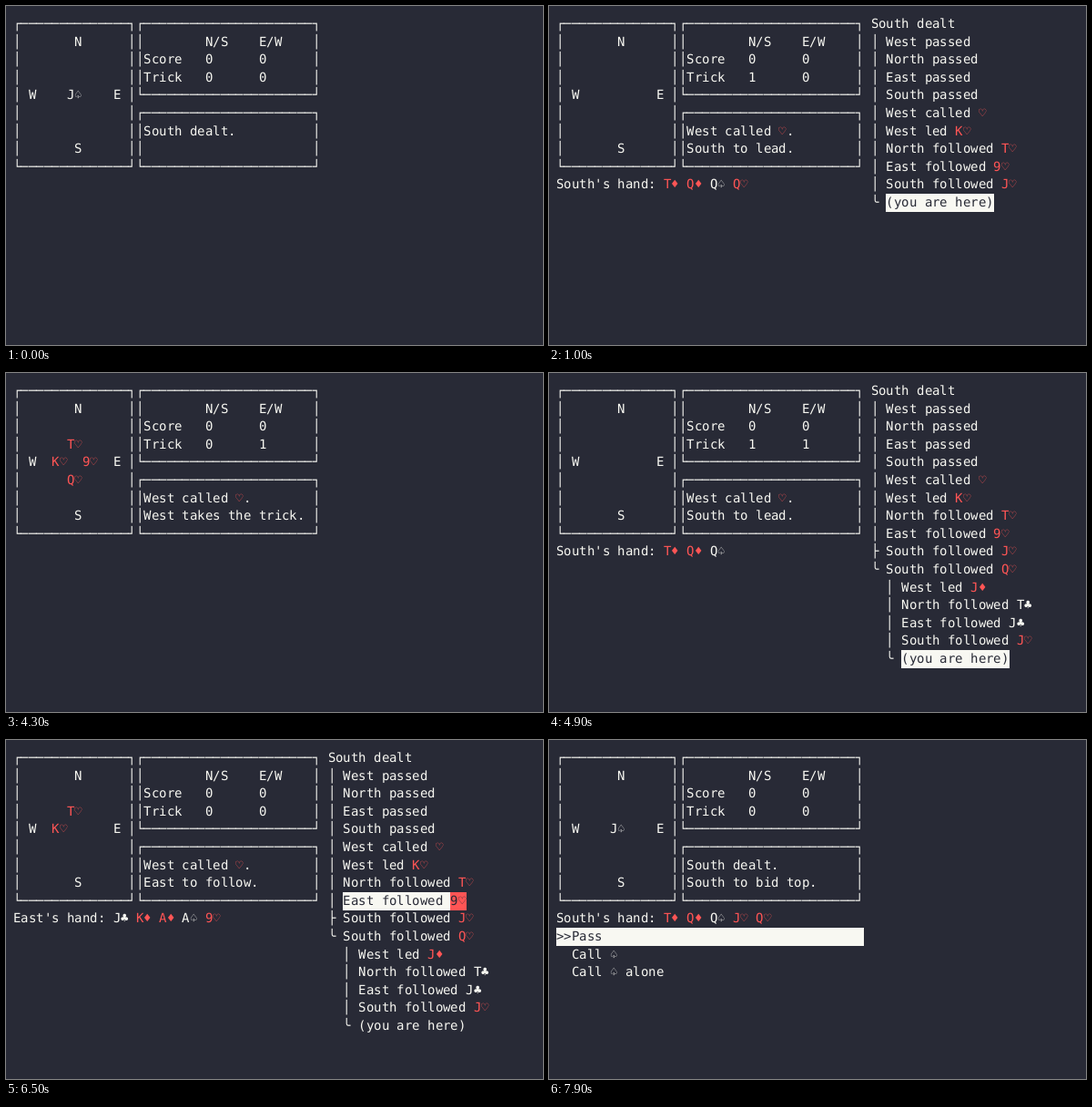
These frames come from a looping animation (590 px wide and 372 px high, 8 s). An HTML page:

```html
<!DOCTYPE html>
<html lang="en">
<head>
<meta charset="utf-8">
<title>Card game in a terminal</title>
<style>
  html, body { margin: 0; width: 100%; height: 100%; overflow: hidden; background: #282a36; }
  svg { display: block; width: 590px; height: 372px; }
  text {
    font: 14px "DejaVu Sans Mono", monospace;
    white-space: pre;
    text-rendering: geometricPrecision;
    transform: rotate(.001deg); /* keeps glyph outlines unhinted */
  }
</style>
</head>
<body>
<svg id="term" viewBox="0 0 590 372"></svg>
<script>
const BG = '#282a36', FG = '#f8f8f2', RED = '#ff5555';
const SIZE = 14, LOOP = 8000;
const term = document.getElementById('term');

// Cells sit on whole pixels.
const cellX = col => Math.round(8 + SIZE * 0.602 * col);
const cellY = row => Math.round(10 + SIZE * 1.4 * row);

// Text at a terminal cell; red suits get their own run.
function put(row, col, str, inverse) {
  const y = cellY(row);
  let out = '';
  for (const run of str.split(/([9TJQKA]?[♡♦])/)) {
    if (!run) continue;
    const color = /[♡♦]/.test(run) ? RED : FG;
    const xs = [...run].map((_, i) => cellX(col + i));
    if (inverse) {
      out += `<rect x="${xs[0]}" y="${y}" width="${xs[xs.length - 1] + 9 - xs[0]}" height="20" fill="${color}"/>`;
    }
    if (run.trim()) {
      out += `<text x="${xs.join(' ')}" y="${y + SIZE}" fill="${inverse ? BG : color}">${run.replace(/>/g, '&gt;')}</text>`;
    }
    col += run.length;
  }
  return out;
}

function box(row, col, w, h) {
  const bar = '─'.repeat(w - 2);
  let out = put(row, col, '┌' + bar + '┐') + put(row + h - 1, col, '└' + bar + '┘');
  for (let r = row + 1; r < row + h - 1; r++) out += put(r, col, '│') + put(r, col + w - 1, '│');
  return out;
}

const table = box(0, 0, 16, 9) + box(0, 16, 24, 5) + box(5, 16, 24, 4) +
  put(1, 8, 'N') + put(4, 2, 'W') + put(4, 13, 'E') + put(7, 8, 'S') +
  put(1, 25, 'N/S') + put(1, 32, 'E/W') + put(2, 17, 'Score') + put(3, 17, 'Trick') +
  put(2, 25, '0') + put(2, 32, '0');

const opening = ['South dealt', '│ West passed', '│ North passed', '│ East passed', '│ South passed',
  '│ West called ♡', '│ West led K♡', '│ North followed T♡', '│ East followed 9♡'];
const here = '╰ (you are here)';
const shortTree = [...opening, '│ South followed J♡', here];
const longTree = [...opening, '├ South followed J♡', '╰ South followed Q♡',
  '  │ West led J♦', '  │ North followed T♣', '  │ East followed J♣', '  │ South followed J♡', '  ' + here];

function drawTree(tree, mark) {
  return tree.map((line, row) => {
    if (row !== mark) return put(row, 41, line);
    const cut = line.search(/[A-Z(]/);
    return put(row, 41, line.slice(0, cut)) + put(row, 41 + cut, line.slice(cut), true);
  }).join('');
}

function drawHand(label, cards, cursor) {
  const head = label + "'s hand: ";
  return put(9, 0, head) +
    cards.split(' ').map((c, i) => put(9, head.length + i * 3, c, i === cursor)).join('');
}

const bidMenu = put(10, 0, '>>Pass'.padEnd(40), true) + put(11, 0, '  Call ♤') + put(12, 0, '  Call ♤ alone');
const spots = { N: [3, 7], W: [4, 5], E: [4, 9], S: [5, 7], C: [4, 7] };

// board: "W:K♡ N:T♡", tricks: "01", hand: [seat, cards, cursor], tree: [lines, marked row]
function screen({ board, tricks = '00', top = 'West called ♡.', msg = '', hand, tree, menu }) {
  let out = table + put(3, 25, tricks[0]) + put(3, 32, tricks[1]) + put(6, 17, top) + put(7, 17, msg);
  if (board) for (const item of board.split(' ')) {
    const [seat, card] = item.split(':');
    out += put(...spots[seat], card);
  }
  if (hand) out += drawHand(...hand);
  if (tree) out += drawTree(...tree);
  if (menu) out += bidMenu;
  return out;
}

const dealt = 'South dealt.', follow = 'South to follow.';
const k = 'W:K♡', kt = k + ' N:T♡', kt9 = kt + ' E:9♡';
const j = 'W:J♦', jt = j + ' N:T♣', jtj = jt + ' E:J♣';
const south5 = 'T♦ Q♦ Q♤ Q♡ J♡', south4 = 'T♦ Q♦ Q♤ J♡';
const bid = { board: 'C:J♤', top: dealt, msg: 'South to bid top.', hand: ['South', 'T♦ Q♦ Q♤ J♡ Q♡'] };
const choose = cursor => ({ board: kt9, msg: follow, hand: ['South', south5, cursor] });
const lead = { tricks: '10', msg: 'South to lead.' };
const browse = (row, state) => ({ ...state, tree: [longTree, row] });

const steps = [
  [0, { board: 'C:J♤', top: dealt }],
  [100, { ...bid, menu: true }],
  [200, {}],
  [300, { board: k }],
  [400, { board: kt }],
  [500, { board: kt9 }],
  [600, choose(0)],
  [700, choose(4)],
  [800, { board: kt9 + ' S:J♡', tricks: '10', msg: 'South takes the trick.' }],
  [900, { ...lead, hand: ['South', 'T♦ Q♦ Q♤ Q♡', 0] }],
  [1000, { ...lead, hand: ['South', 'T♦ Q♦ Q♤ Q♡'], tree: [shortTree, 10] }],
  [2000, { ...choose(), tree: [shortTree, 9] }],
  [3000, choose(0)],
  [4000, choose(1)],
  [4100, choose(2)],
  [4200, choose(3)],
  [4300, { board: kt9 + ' S:Q♡', tricks: '01', msg: 'West takes the trick.' }],
  [4400, { board: j, tricks: '01' }],
  [4500, { board: jt, tricks: '01' }],
  [4600, { board: jtj, tricks: '01' }],
  [4700, { board: jtj, tricks: '01', msg: follow, hand: ['South', south4, 3] }],
  [4800, { board: jtj + ' S:J♡', tricks: '11', msg: 'South takes the trick.' }],
  [4900, browse(15, { tricks: '11', msg: 'South to lead.', hand: ['South', 'T♦ Q♦ Q♤'] })],
  [5900, browse(14, { board: jtj, tricks: '01', msg: follow, hand: ['South', south4] })],
  [6000, browse(13, { board: jt, tricks: '01', msg: 'East to follow.', hand: ['East', 'J♣ K♦ A♦ A♤'] })],
  [6100, browse(12, { board: j, tricks: '01', msg: 'North to follow.', hand: ['North', 'T♣ Q♣ 9♤ K♤'] })],
  [6200, browse(11, { tricks: '01', msg: 'West to lead.', hand: ['West', '9♣ A♣ A♡ J♦'] })],
  [6300, browse(10, choose())],
  [6400, browse(9, choose())],
  [6500, browse(8, { board: kt, msg: 'East to follow.', hand: ['East', 'J♣ K♦ A♦ A♤ 9♡'] })],
  [6600, browse(7, { board: k, msg: 'North to follow.', hand: ['North', 'T♣ Q♣ 9♤ K♤ T♡'] })],
  [6700, browse(6, { msg: 'West to lead.', hand: ['West', '9♣ A♣ K♡ A♡ J♦'] })],
  [6800, browse(5, { top: dealt, msg: 'West to bid.', hand: ['West', '9♣ A♣ J♦ K♡ A♡'] })],
  [6900, browse(4, bid)],
  [7900, { ...bid, menu: true }]
].map(([at, state]) => ({ at, svg: screen(state) }));

const start = performance.now();
let shown = -1;

function tick() {
  const t = (performance.now() - start) % LOOP;
  let i = steps.length - 1;
  while (steps[i].at > t) i--;
  if (i !== shown) term.innerHTML = steps[shown = i].svg;
  requestAnimationFrame(tick);
}
tick();
</script>
</body>
</html>
```
